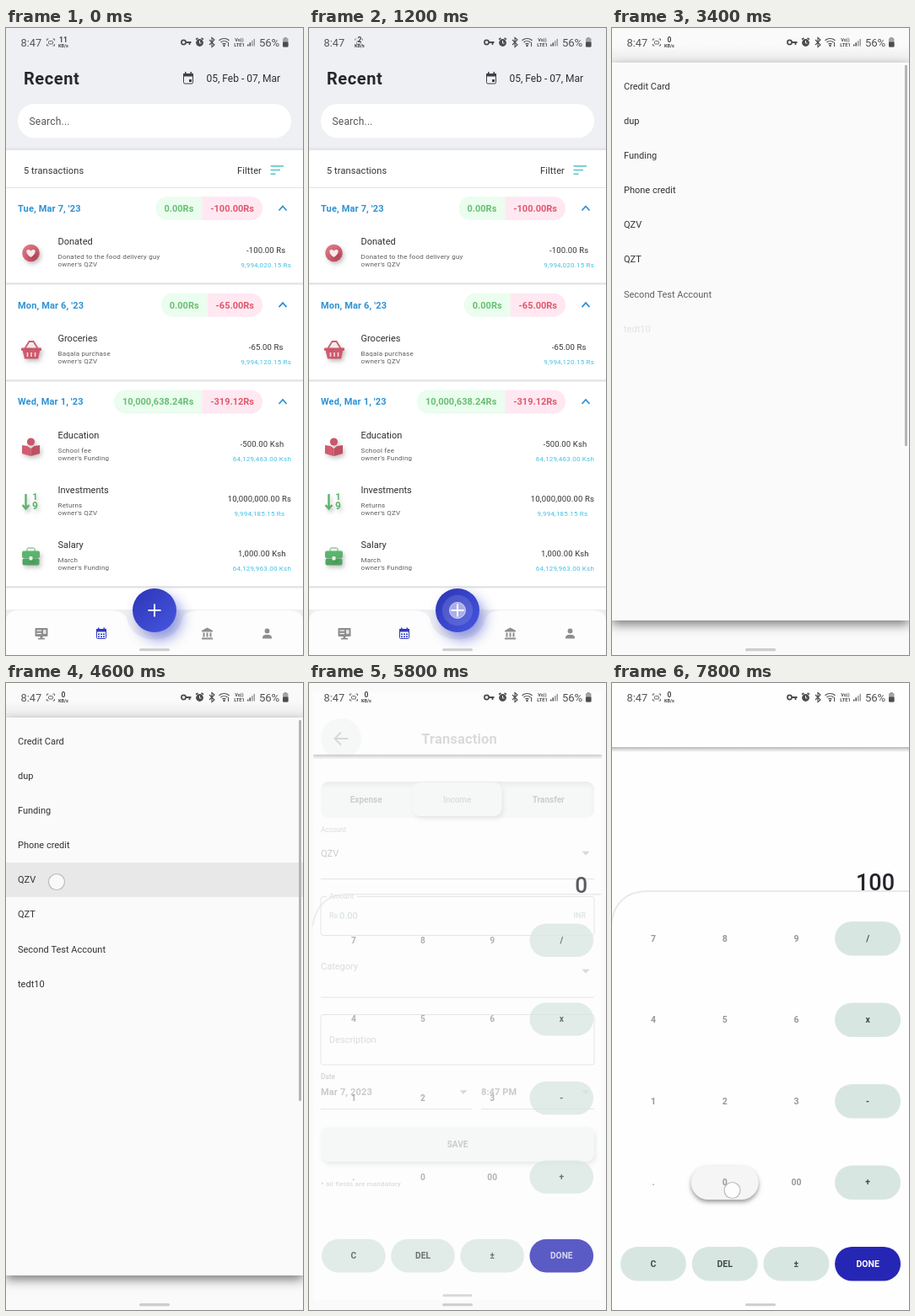
Recreate the animation shown at these times as an HTML page with a canvas. Size 352 px wide and 744 px high, loop 8000 ms.

```html
<!DOCTYPE html>
<html lang="en">
<head>
<meta charset="utf-8">
<title>Expense tracker</title>
<style>
  html, body { margin: 0; width: 100%; height: 100%; overflow: hidden; background: #fafafa; }
  canvas { display: block; width: 352px; height: 744px; }
</style>
</head>
<body>
<canvas id="stage"></canvas>
<script>
const W = 352, H = 744, LOOP = 8000, STEP = 200;
const canvas = document.getElementById('stage');
const ctx = canvas.getContext('2d');
const dpr = window.devicePixelRatio || 1;
canvas.width = W * dpr;
canvas.height = H * dpr;

const RED = '#d35c70', GREEN = '#5bb56b', MINT = '#dde7e5', GREY = '#8e8e8e';

// ---------- helpers ----------
function setFont(size, weight, spacing) {
  ctx.font = `${weight} ${size}px Roboto, sans-serif`;
  ctx.letterSpacing = spacing + 'px';
}
// y is the middle of the capitals
function text(s, x, y, size, color, { w = 400, ls = 0, align = 'left' } = {}) {
  setFont(size, w, ls);
  ctx.textAlign = align;
  ctx.fillStyle = color;
  ctx.fillText(s, x, y + size * 0.355);
}
function widthOf(s, size, w, ls) {
  setFont(size, w, ls);
  return ctx.measureText(s).width;
}
function rect(x, y, w, h, color) {
  ctx.fillStyle = color;
  ctx.fillRect(x, y, w, h);
}
function box(x, y, w, h, r, fill, stroke) {
  ctx.beginPath();
  ctx.roundRect(x, y, w, h, r);
  if (fill) { ctx.fillStyle = fill; ctx.fill(); }
  if (stroke) { ctx.strokeStyle = stroke; ctx.lineWidth = 1; ctx.stroke(); }
}
function disc(x, y, r, fill) {
  ctx.beginPath();
  ctx.arc(x, y, r, 0, 7);
  ctx.fillStyle = fill;
  ctx.fill();
}
function poly(points, color, width) {
  ctx.beginPath();
  for (let i = 0; i < points.length; i += 2) ctx.lineTo(points[i], points[i + 1]);
  if (width) {
    ctx.strokeStyle = color; ctx.lineWidth = width; ctx.stroke();
  } else {
    ctx.fillStyle = color; ctx.fill();
  }
}
function arc(x, y, r, a, b, color, width) {
  ctx.beginPath();
  ctx.arc(x, y, r, a, b);
  ctx.strokeStyle = color;
  ctx.lineWidth = width;
  ctx.stroke();
}
function group(draw, { x = 0, y = 0, alpha = 1, scale = 1 } = {}) {
  ctx.save();
  ctx.globalAlpha *= alpha;
  ctx.translate(x, y);
  ctx.scale(scale, scale);
  draw();
  ctx.restore();
}
function shadow(color, blur, dx, dy, draw) {
  ctx.save();
  ctx.shadowColor = color;
  ctx.shadowBlur = blur * dpr;
  ctx.shadowOffsetX = dx * dpr;
  ctx.shadowOffsetY = dy * dpr;
  draw();
  ctx.restore();
}
function blend(y, h, from, to) {
  const g = ctx.createLinearGradient(0, y, 0, y + h);
  g.addColorStop(0, from);
  g.addColorStop(1, to);
  return g;
}
const clamp = v => Math.max(0, Math.min(1, v));

function touch(x, y, alpha = 1) {
  group(() => {
    disc(0, 0, 9.5, 'rgba(255,255,255,.75)');
    arc(0, 0, 9.5, 0, 7, '#b9bcbc', 1.2);
  }, { x, y, alpha });
}

// ---------- status bar ----------
function captureIcon(x) {
  group(() => {
    for (const [sx, sy] of [[-1, -1], [1, -1], [1, 1], [-1, 1]])
      poly([sx * 2.5, sy * 4, sx * 4.5, sy * 4, sx * 4.5, sy * 2], '#666', 1);
    box(-2.5, -1.5, 5, 3.5, 1, null, '#666');
  }, { x, y: 17 });
}
function speed(x, n) {
  text(n, x, 14, 8.5, '#444', { w: 700, align: 'center' });
  text('KB/s', x, 21, 5.5, '#444', { w: 700, align: 'center' });
}
function statusBar(t) {
  const c = '#4c4c4c';
  text('8:47', 17.5, 17, 12.8, '#555');
  if (t === 1200) {
    speed(60, '2');
    group(() => captureIcon(59), { alpha: 0.6 });
  } else {
    captureIcon(53);
    speed(68, t < 1200 ? '11' : '0');
  }
  // key
  arc(210.5, 17, 2.6, 0, 7, c, 1.7);
  poly([213, 17, 219.5, 17], c, 2);
  poly([217.5, 17, 217.5, 20], c, 1.8);
  // alarm
  disc(229.5, 17.5, 4.4, c);
  poly([225, 13.5, 227.5, 12], c, 1.5);
  poly([234, 13.5, 231.5, 12], c, 1.5);
  poly([229.5, 15, 229.5, 18, 231.5, 18], '#eee', 1);
  // bluetooth
  poly([241, 14, 247, 20, 244, 22.5, 244, 11.5, 247, 14, 241, 20], c, 1.1);
  // wifi
  for (const r of [3, 6, 9]) arc(258.5, 21.5, r, -2.3, -0.84, c, 1.2);
  disc(258.5, 21, 1.2, c);
  poly([263.5, 17, 263.5, 22], c, 1);
  text('Vo))', 276.5, 14, 5.5, c, { w: 700, align: 'center' });
  text('LTE1', 276.5, 20, 5.8, c, { w: 700, align: 'center' });
  for (let i = 0; i < 4; i++)
    rect(286 + i * 2.5, 19.5 - i * 2.2, 1.5, 2 + i * 2.2, i < 2 ? c : '#999');
  text('56%', 300, 17, 13.2, '#505050', { ls: -0.2 });
  box(328, 12, 6.5, 10.5, 1.2, '#a5a5a5');
  rect(329.7, 11, 3, 1.5, '#999');
  box(328, 16.5, 6.5, 6, 1, c);
}
const homeBar = () => box(158, 736.2, 36, 3, 1.5, '#cdcdcd');

// ---------- list page ----------
const icons = {
  heart() {
    const g = ctx.createLinearGradient(-8, -8, 8, 10);
    g.addColorStop(0, '#dc7a86');
    g.addColorStop(1, '#c5465c');
    disc(0, 0, 10.3, g);
    ctx.beginPath();
    ctx.moveTo(0, 5);
    ctx.bezierCurveTo(-9, -1, -4.5, -7, 0, -2.5);
    ctx.bezierCurveTo(4.5, -7, 9, -1, 0, 5);
    ctx.fillStyle = '#f9e9eb';
    ctx.fill();
  },
  basket() {
    box(-11.5, -2.5, 24, 3.5, 1, RED);
    poly([-10, 0, 11, 0, 8.5, 10.5, -7.5, 10.5], RED);
    poly([-7, -2, -2, -10, 3, -10, 8, -2], RED, 1.8);
    for (const x of [-4, 0.5, 5]) poly([x, 3, x, 8], '#f7d9dd', 1.6);
  },
  reader() {
    disc(0, -6, 4.6, '#c9586a');
    poly([-10.5, -2, -4, -1, 0, 2, 0, 11, -10.5, 8], RED);
    poly([10.5, -2, 4, -1, 0, 2, 0, 11, 10.5, 8], '#c04f62');
  },
  invest() {
    poly([-6, -9, -6, 8], GREEN, 2.4);
    poly([-10, 4, -6, 8.5, -2, 4], GREEN, 2.4);
    text('1', 5, -6, 11, GREEN, { w: 700, align: 'center' });
    text('9', 5, 5, 12, GREEN, { w: 700, align: 'center' });
  },
  briefcase() {
    box(-4.5, -10, 9, 7, 1.5, null, GREEN);
    box(-10.5, -6.5, 21, 8.5, 2, GREEN);
    box(-10, 2.5, 20, 8, 2, '#50a562');
    box(-2, 0, 4, 4.5, 1, '#e6f5e8');
  }
};

function entry(y, icon, name, note, owner, sum, total) {
  shadow('rgba(0,0,0,.22)', 5, 2, 3, () => group(icons[icon], { x: 29.5, y: y + 14 }));
  text(name, 61.5, y, 11, '#303030');
  text(note, 61.5, y + 18, 8, '#5c5c5c', { ls: 0.2 });
  text(owner, 61.5, y + 27, 8, '#5c5c5c', { ls: 0.2 });
  const mid = 338 - Math.max(widthOf(sum, 9.5, 400, 0.15), widthOf(total, 8, 400, 0.2)) / 2;
  text(sum, mid, y + 10.5, 9.5, '#333', { ls: 0.15, align: 'center' });
  text(total, mid, y + 28, 8, '#45bfe5', { ls: 0.2, align: 'center' });
}
function dayHeader(y, day, plus, minus) {
  text(day, 14, y, 11, '#2f92d4', { w: 700, ls: 0.15 });
  const mw = widthOf(minus, 11, 700, 0) + 20;
  const pw = widthOf(plus, 11, 700, 0) + 20;
  const split = 304 - mw;
  box(split - pw, y - 14, pw, 28, [14, 0, 0, 14], '#eafdee');
  box(split, y - 14, mw, 28, [0, 14, 14, 0], '#ffe8f1');
  text(plus, split - pw + 10, y, 11, '#68bf72', { w: 700 });
  text(minus, split + 10, y, 11, '#e0586c', { w: 700 });
  poly([323.5, y + 2.5, 328, y - 2.5, 332.5, y + 2.5], '#2f92d4', 1.8);
}
function divider(y) {
  rect(0, y, W, 3, blend(y, 3, '#d2d4d6', '#ffffff'));
}

function navBar() {
  rect(0, 690, W, 54, '#efeff1');
  ctx.beginPath();
  ctx.moveTo(0, H);
  ctx.lineTo(0, 704);
  ctx.quadraticCurveTo(0, 691, 18, 691);
  ctx.lineTo(122, 691);
  ctx.quadraticCurveTo(141, 691, 144, 703);
  ctx.bezierCurveTo(150, 733, 202, 733, 208, 703);
  ctx.quadraticCurveTo(211, 691, 230, 691);
  ctx.lineTo(334, 691);
  ctx.quadraticCurveTo(W, 691, W, 704);
  ctx.lineTo(W, H);
  ctx.fillStyle = '#fdfdfd';
  ctx.fill();

  // dashboard
  box(34.5, 712, 15, 10, 1, GREY);
  poly([36.5, 715, 42, 715], '#fff', 1.2);
  poly([36.5, 718.5, 42, 718.5], '#fff', 1.2);
  box(44, 714, 3.5, 5, 1, '#e6e6e6');
  rect(40.5, 722, 3, 3, GREY);
  rect(38, 724, 8, 1.5, GREY);
  // calendar
  box(107.5, 713.5, 11, 11, 1, null, '#2f3ac0');
  rect(107, 713, 12, 3.5, '#2f3ac0');
  for (let i = 0; i < 6; i++)
    rect(109 + i % 3 * 3, 718.5 + (i > 2) * 3, 2, 1.6, '#2f3ac0');
  rect(109, 711.5, 1.5, 2, '#2f3ac0');
  rect(115.5, 711.5, 1.5, 2, '#2f3ac0');
  // bank
  poly([232, 716.5, 232, 715, 238.5, 711.5, 245, 715, 245, 716.5], GREY);
  for (const x of [233.5, 237.5, 241.5]) rect(x, 717.5, 2, 5, GREY);
  rect(232, 723.5, 13, 2, GREY);
  // profile
  disc(309.5, 715.5, 2.9, GREY);
  box(304, 720, 11, 4.5, [4, 4, 0, 0], GREY);
}

function fab(press) {
  const g = ctx.createLinearGradient(156, 670, 196, 714);
  g.addColorStop(0, '#2f38bb');
  g.addColorStop(1, '#4454dc');
  shadow('rgba(60,75,205,.55)', 16, 6, 9, () => disc(176, 691, 26, g));
  disc(176, 691, 26 * clamp(0.4 + press * 0.6), `rgba(255,255,255,${press && 0.13})`);
  if (press) {
    disc(176, 691, 9.5, 'rgba(255,255,255,.5)');
    arc(176, 691, 9.5, 0, 7, 'rgba(225,228,250,.8)', 1);
  }
  poly([168.5, 691, 183.5, 691], '#fff', 2);
  poly([176, 683.5, 176, 698.5], '#fff', 2);
}

function listPage(t) {
  rect(0, 0, W, H, '#fff');
  rect(0, 0, W, 144, '#eff0f3');
  text('Recent', 21, 60, 20, '#24282c', { w: 700, ls: 0.6 });
  box(210.5, 54.5, 11, 11.5, 1.5, null, '#3c4148');
  rect(210, 54, 12, 3.5, '#3c4148');
  rect(212, 52, 1.5, 3, '#3c4148');
  rect(218.5, 52, 1.5, 3, '#3c4148');
  rect(217, 61, 3, 3, '#3c4148');
  text('05, Feb - 07, Mar', 237.5, 60, 12, '#2b2f33');
  box(14, 90, 324, 40.5, 20, '#fff');
  text('Search...', 27.5, 110.5, 12, '#555', { ls: 0.2 });
  rect(0, 141, W, 4, blend(141, 4, '#eff0f3', '#dfe1e4'));

  text('5 transactions', 21, 169, 11, '#333', { ls: 0.1 });
  text('Filtter', 274, 169, 11, '#333', { ls: 0.1 });
  [15.5, 11.5, 6].forEach((w, i) => rect(313.5, 163 + i * 4.7, w, 1.7, '#62cbc9'));
  rect(0, 189, W, 1, '#e1e3e5');

  dayHeader(214, "Tue, Mar 7, '23", '0.00Rs', '-100.00Rs');
  entry(253, 'heart', 'Donated', 'Donated to the food delivery guy', "owner's QZV", '-100.00 Rs', '9,994,020.15 Rs');
  divider(302.5);
  dayHeader(328.7, "Mon, Mar 6, '23", '0.00Rs', '-65.00Rs');
  entry(368, 'basket', 'Groceries', 'Baqala purchase', "owner's QZV", '-65.00 Rs', '9,994,120.15 Rs');
  divider(417.5);
  dayHeader(443.5, "Wed, Mar 1, '23", '10,000,638.24Rs', '-319.12Rs');
  entry(483, 'reader', 'Education', 'School fee', "owner's Funding", '-500.00 Ksh', '64,129,463.00 Ksh');
  entry(548, 'invest', 'Investments', 'Returns', "owner's QZV", '10,000,000.00 Rs', '9,994,185.15 Rs');
  entry(613, 'briefcase', 'Salary', 'March', "owner's Funding", '1,000.00 Ksh', '64,129,963.00 Ksh');
  divider(662.5);
  navBar();
  fab(t < 1200 ? 0 : t < 1400 ? 0.5 : 1);
  homeBar();
}

// ---------- transaction form ----------
const LINE = '#9b9d9d', LABEL = '#747676';
const down = (x, y) => poly([x - 4.5, y - 2.2, x + 4.5, y - 2.2, x, y + 2.4], '#666a6a');
const rule = (x, y, w) => rect(x, y, w, 1, LINE);

function segments(pos, accent) {
  box(14, 117, 324, 43, 9, MINT);
  ctx.save();
  ctx.clip();
  rect(14, 117, 324, 8, blend(117, 8, 'rgba(110,125,122,.45)', 'rgba(110,125,122,0)'));
  const g = ctx.createLinearGradient(332, 0, 338, 0);
  g.addColorStop(0, 'rgba(110,125,122,0)');
  g.addColorStop(1, 'rgba(110,125,122,.2)');
  rect(332, 117, 6, 43, g);
  ctx.restore();
  shadow('rgba(80,95,92,.5)', 5, 2, 3, () => box(15 + pos * 107.5, 118, 106, 40, 9, '#dfe9e7'));
  ['Expense', 'Income', 'Transfer'].forEach((s, i) =>
    text(s, 67.7 + i * 108, 138.5, 10, i === Math.round(pos) ? accent : '#3a3e3e', { w: 700, align: 'center' }));
}

function formPage({ seg = 0, account = false } = {}) {
  const income = seg > 0.5;
  const accent = income ? '#7ba083' : '#b4595d';
  rect(0, 0, W, H, '#fafafa');
  disc(38, 66, 24, MINT);
  poly([46.5, 66, 30.5, 66], '#626767', 2);
  poly([38, 58.5, 30.5, 66, 38, 73.5], '#626767', 2);
  text('Transaction', 178, 66, 16.5, '#6b6f6f', { w: 700, ls: 0.15, align: 'center' });
  segments(seg, income ? '#6f8f78' : '#9b4a4e');

  if (account) {
    text('Account', 14, 174, 8.2, LABEL);
    text('QZV', 14, 202, 11, '#333');
  } else {
    text('Account', 14, 196, 11, LABEL);
  }
  down(328, 202);
  rule(14, 232, 324);

  box(14, 253.5, 324, 46, 3, null, LINE);
  rect(21, 252, 36, 3, '#fafafa');
  text('Amount', 24, 253, 8.2, LABEL);
  if (account) {
    text('Rs', 24, 276, 9, accent, { w: 500 });
    text('INR', 328, 276, 9, accent, { w: 500, align: 'right' });
  }
  text('0.00', account ? 36 : 24, 276, 11, accent, { w: 500 });

  text('Category', 14, 336, 11, LABEL);
  down(328, 342);
  rule(14, 372.5, 324);
  box(14, 393.5, 324, 59.5, 3, null, LINE);
  text('Description', 24, 423, 11, LABEL);

  text('Date', 14, 467, 8.2, '#555', { w: 500 });
  text('Mar 7, 2023', 14, 485.5, 11, '#2d3030', { w: 700, ls: 0.15 });
  down(183, 485.5);
  rule(14, 505, 179);
  text('8:47 PM', 204, 485.5, 11, '#2d3030', { w: 700, ls: 0.1 });
  down(328, 485.5);
  rule(204, 505, 134);

  shadow('rgba(90,105,102,.5)', 5, 2, 3, () => box(14, 527, 324, 41, 9, MINT));
  text('SAVE', 176, 547, 10, '#333', { w: 700, align: 'center' });
  text('* all fields are mandatory', 14, 594, 8, '#62807a', { ls: 0.2, w: 500 });
  homeBar();
}

// ---------- account menu ----------
const accounts = ['Credit Card', 'dup', 'Funding', 'Phone credit', 'QZV', 'QZT', 'Second Test Account', 'tedt10'];

// p runs 0..1: sheet fades in, unfolds, then the rows appear one by one
function menu(p, pick = 0) {
  const grow = clamp((p - 0.25) * 4);
  const top = 180 - 139 * grow, bottom = 224 + 479 * grow;
  group(() => {
    rect(0, 0, W, 41, blend(20, 21, '#fafafa', '#ededed'));
    shadow('rgba(0,0,0,.5)', 12, 0, 5, () => rect(0, top, W, bottom - top, '#fafafa'));
    if (pick) rect(0, 213, W, 41, `rgba(0,0,0,${pick * 0.07})`);
    accounts.forEach((s, i) => group(
      () => text(s, 14, 69 + i * 41.1, 11, '#333'),
      { alpha: clamp((p - 0.52 - i * 0.0205) / 0.031) }));
    if (p > 0.5) box(347, 44, 3, 452, 1, '#b5b5b5');
    homeBar();
  }, { alpha: clamp(p * 4) });
}

// ---------- calculator ----------
const keys = ['789/', '456x', '123-'].map(r => [...r]).concat([['.', '0', '00', '+'], ['C', 'DEL', '±', 'DONE']]);

function calculator(value, held, lift = 1) {
  rect(0, 0, W, H, '#fefefe');
  rect(0, 76, W, 6, blend(76, 6, '#b9b9b9', '#fefefe'));
  text(value, 335, 236, 27, '#24252c', { w: 500, align: 'right' });
  ctx.beginPath();
  ctx.moveTo(-1, 286);
  ctx.bezierCurveTo(2, 262, 16, 247, 42, 247);
  ctx.lineTo(W, 247);
  ctx.strokeStyle = '#e9e9e9';
  ctx.lineWidth = 2;
  ctx.stroke();

  keys.forEach((row, r) => row.forEach((key, c) => {
    const x = 49 + c * 84.7, y = 303.2 + r * 96.5;
    const done = key === 'DONE', op = c === 3 || r === 4;
    if (op) box(x - 39, y - 20.3, 78, 40.6, 20.3, done ? '#2626b5' : '#d8e6e2');
    if (key === held) group(() => shadow('rgba(0,0,0,.38)', 5, 0, 3,
      () => box(x - 40, y - 20.3, 80, 40.6, 20.3, '#f5f5f5')), { alpha: lift });
    text(key, x, y, 10.5, done ? '#fff' : op ? '#444a4a' : '#989898', { w: 700, align: 'center' });
  }));
  homeBar();
}

// ---------- timeline ----------
function scene(t) {
  if (t < 1600) return listPage(t);
  if (t < 1800) {
    listPage(t);
    return group(() => {
      ctx.translate(-176, -372);
      formPage();
    }, { x: 176, y: 372, scale: 0.97, alpha: 0.75 });
  }
  if (t < 5000) {
    formPage();
    if (t === 3200) touch(190, 206);
    if (t >= 3400 && t < 4800) menu(t < 3600 ? 0.667 : 1, t === 4400 ? 0.5 : t === 4600 ? 1 : 0);
    if (t === 4800) group(() => menu(1), { alpha: 0.35 });
    if (t === 4400 || t === 4600) touch(60, 236);
    return;
  }
  if (t < 6000) {
    formPage({ seg: t < 5400 ? 0 : t < 5600 ? 0.55 : 1, account: true });
    if (t === 5400) touch(182, 142);
    if (t === 5600) touch(237.5, 280.5);
    if (t === 5800) group(() => {
      ctx.translate(-176, -372);
      calculator('0');
    }, { x: 176, y: 372, scale: 0.97, alpha: 0.75 });
    return;
  }
  const value = t < 7000 ? '0' : t < 7400 ? '1' : t < 7800 ? '10' : '100';
  const one = t === 6600 || t === 6800;
  const zero = t === 7200 || t >= 7600;
  calculator(value, one ? '1' : zero ? '0' : '', t === 6600 ? 0.5 : 1);
  if (one) touch(45, 501);
  if (zero) touch(142.5, 602);
}

function frame(now) {
  const t = Math.floor(now % LOOP / STEP) * STEP;
  ctx.setTransform(dpr, 0, 0, dpr, 0, 0);
  ctx.globalAlpha = 1;
  scene(t);
  statusBar(t);
  requestAnimationFrame(frame);
}
requestAnimationFrame(frame);
</script>
</body>
</html>
```
